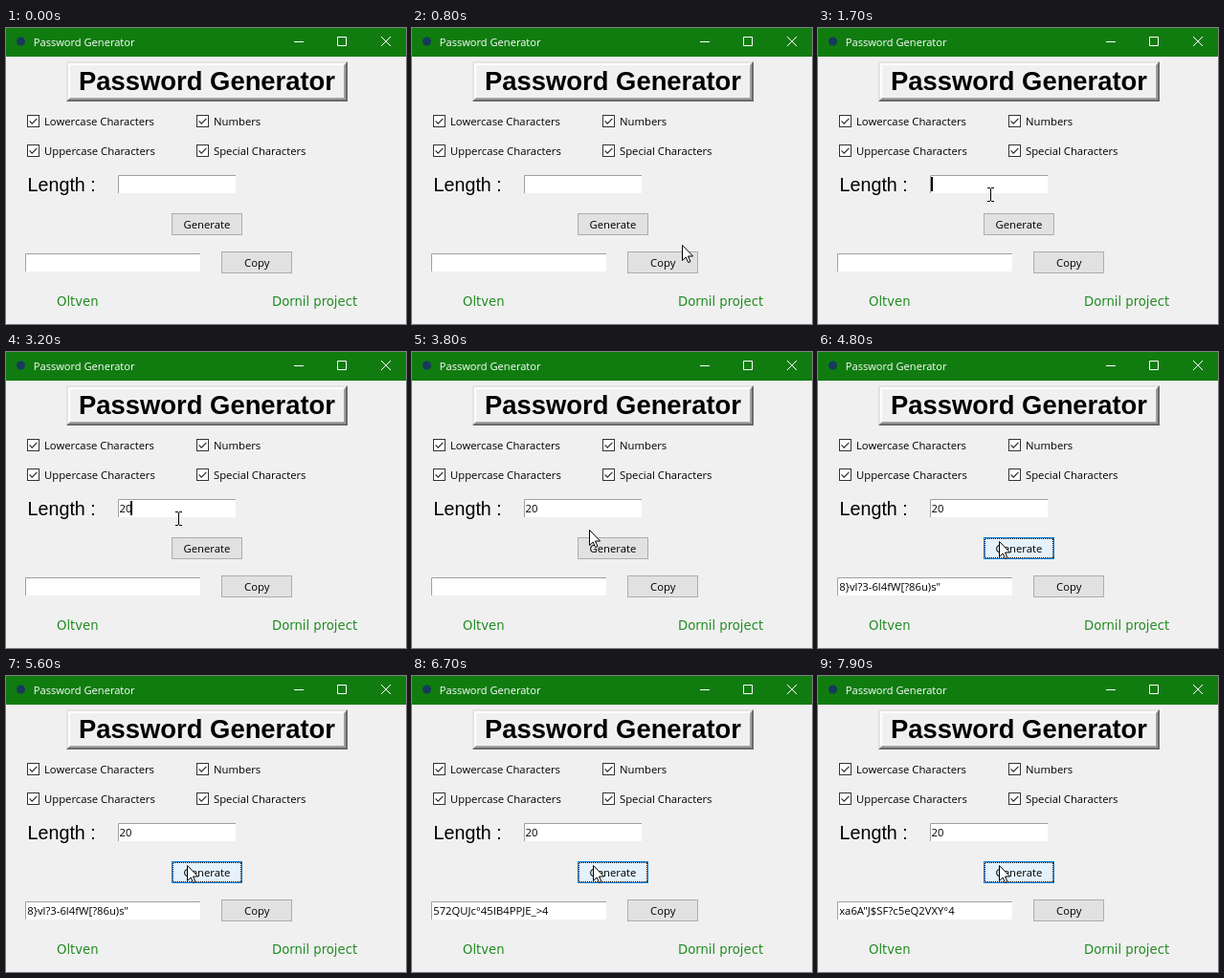
Animation of 418 by 310 pixels, one loop 8000 ms. Source, as an HTML page:

```html
<!DOCTYPE html>
<html lang="en">
<head>
<meta charset="utf-8">
<title>Password Generator</title>
<style>
  html, body { margin: 0; width: 100%; height: 100%; overflow: hidden; background: #f0f0f0; }
  svg { display: block; font: 11.3px "Open Sans", "Noto Sans", sans-serif; }
  text { white-space: pre; }
  .arial { font-family: "Liberation Sans", Arial, sans-serif; }
  .link { font: 13.2px "DejaVu Sans", Verdana, sans-serif; fill: #228b22; }
  .button { fill: #e1e1e1; stroke: #adadad; }
  .hover { fill: #e5f1fb; stroke: #0078d7; }
  .pressed { fill: #cce4f7; stroke: #005499; }
</style>
</head>
<body>
<svg width="418" height="310" viewBox="0 0 418 310">
  <defs>
    <g id="check">
      <rect x=".5" y=".5" width="12" height="12" fill="#fff" stroke="#333"/>
      <path d="M2.6 6.4L5.2 9.2L10.4 3.8" fill="none" stroke="#222" stroke-width="1.1"/>
    </g>
  </defs>
  <rect width="418" height="310" fill="#f0f0f0"/>

  <rect width="418" height="30" fill="#107c10"/>
  <circle cx="15.5" cy="14" r="4.5" fill="#163a5c"/>
  <text x="28.8" y="19" font-size="11.1" fill="#fff">Password Generator</text>
  <path d="M301 14.5H311M346.5 9.5H355.5V18.5H346.5ZM392 9L402 19M402 9L392 19" fill="none" stroke="#fff"/>

  <path d="M63 77V35H357L355 37H65V75Z" fill="#e3e3e3"/>
  <path d="M65 75V37H355L353 39H67V73Z" fill="#fff"/>
  <path d="M357 35V77H63L65 75H355V37Z" fill="#696969"/>
  <path d="M355 37V75H65L67 73H353V39Z" fill="#a0a0a0"/>
  <text class="arial" x="76.1" y="65" font-size="27.4" font-weight="700">Password Generator</text>

  <use href="#check" x="22" y="91"/><text x="40" y="102">Lowercase Characters</text>
  <use href="#check" x="199" y="91"/><text x="217" y="102">Numbers</text>
  <use href="#check" x="22" y="122"/><text x="40" y="133">Uppercase Characters</text>
  <use href="#check" x="199" y="122"/><text x="217" y="133">Special Characters</text>

  <text class="arial" x="22.6" y="171" font-size="19.7">Length :</text>
  <rect x="117" y="154" width="123" height="19" fill="#fff"/>
  <path d="M117.5 173V154.5H240" fill="none" stroke="#a0a0a0"/>
  <text id="length" x="118.6" y="168"></text>
  <rect id="caret" y="156" width="2" height="15"/>

  <rect id="generate" class="button" x="173.5" y="194.5" width="73" height="22"/>
  <path id="focus" d="M175 195.5H246M175 215.5H246M174.5 196V216M245.5 196V216" stroke="#000" stroke-dasharray="1 1"/>
  <text x="209.9" y="210" text-anchor="middle">Generate</text>

  <rect x="20" y="236" width="183" height="19" fill="#fff"/>
  <path d="M20.5 255V236.5H203" fill="none" stroke="#a0a0a0"/>
  <text id="password" x="22.2" y="250"></text>
  <rect class="button" x="225.5" y="234.5" width="73" height="22"/>
  <text x="262.2" y="250" text-anchor="middle">Copy</text>

  <text class="link" x="53" y="291">Oltven</text>
  <text class="link" x="278" y="291">Dornil project</text>

  <path id="arrow" d="M.5 .5V16.5L4.2 13L6.7 18.6L9 17.6L6.5 12H11.6Z" fill="#fff" stroke="#000"/>
  <path id="beam" d="M-3 -6.5H0M1 -6.5H4M.5 -6V7M-3 7.5H0M1 7.5H4" fill="none" stroke="#000"/>
</svg>
<script>
const LOOP = 8000, STEP = 100;
const $ = id => document.getElementById(id);
const show = (id, on) => $(id).setAttribute("visibility", on ? "visible" : "hidden");

// [time, x, y] of the pointer
const path = [[200, 390, 273], [900, 264, 219], [1300, 180, 174], [3600, 180, 174], [4000, 189, 198]];
const clicks = [
  [4700, '8}vl?3-6l4fW[?86u)s"'],
  [6000, "572QUJc°45IB4PPJE_>4"],
  [7200, 'xa6A"J$SF?c5eQ2VXY°4']
];

function pointer(t) {
  const i = path.findIndex(p => p[0] > t);
  if (i < 0) return path[path.length - 1].slice(1);
  const [a, b] = [path[Math.max(i - 1, 0)], path[i]];
  const k = Math.max(0, (t - a[0]) / (b[0] - a[0] || 1));
  return [1, 2].map(n => Math.round(a[n] + (b[n] - a[n]) * k));
}

function caretOn(t) {
  if (t < 1400 || t >= clicks[0][0]) return false;
  if (t < 2200) return t < 2000;
  return t < 2900 || (t - 2900) % 900 >= 300;
}

function draw(t) {
  const [x, y] = pointer(t);
  const inEntry = x >= 117 && x < 240 && y < 177;
  show("arrow", t >= path[0][0] && !inEntry);
  show("beam", inEntry);
  for (const id of ["arrow", "beam"]) $(id).setAttribute("transform", `translate(${x} ${y})`);

  const typed = "20".slice(0, t < 2200 ? 0 : t < 2500 ? 1 : 2);
  $("length").textContent = typed;
  $("caret").setAttribute("x", [118, 125, 130][typed.length]);
  show("caret", caretOn(t));

  const done = clicks.filter(c => c[0] <= t);
  $("password").textContent = done.length ? done[done.length - 1][1] : "";
  show("focus", done.length > 0);

  const down = clicks.some(c => t >= c[0] - 100 && t < c[0]);
  const over = t > 3600 && y >= 194;
  $("generate").setAttribute("class", "button" + (down ? " pressed" : over ? " hover" : ""));
}

const start = performance.now();
function tick() {
  const t = (performance.now() - start) % LOOP;
  draw(Math.floor(t / STEP) * STEP);
  requestAnimationFrame(tick);
}
tick();
</script>
</body>
</html>
```
